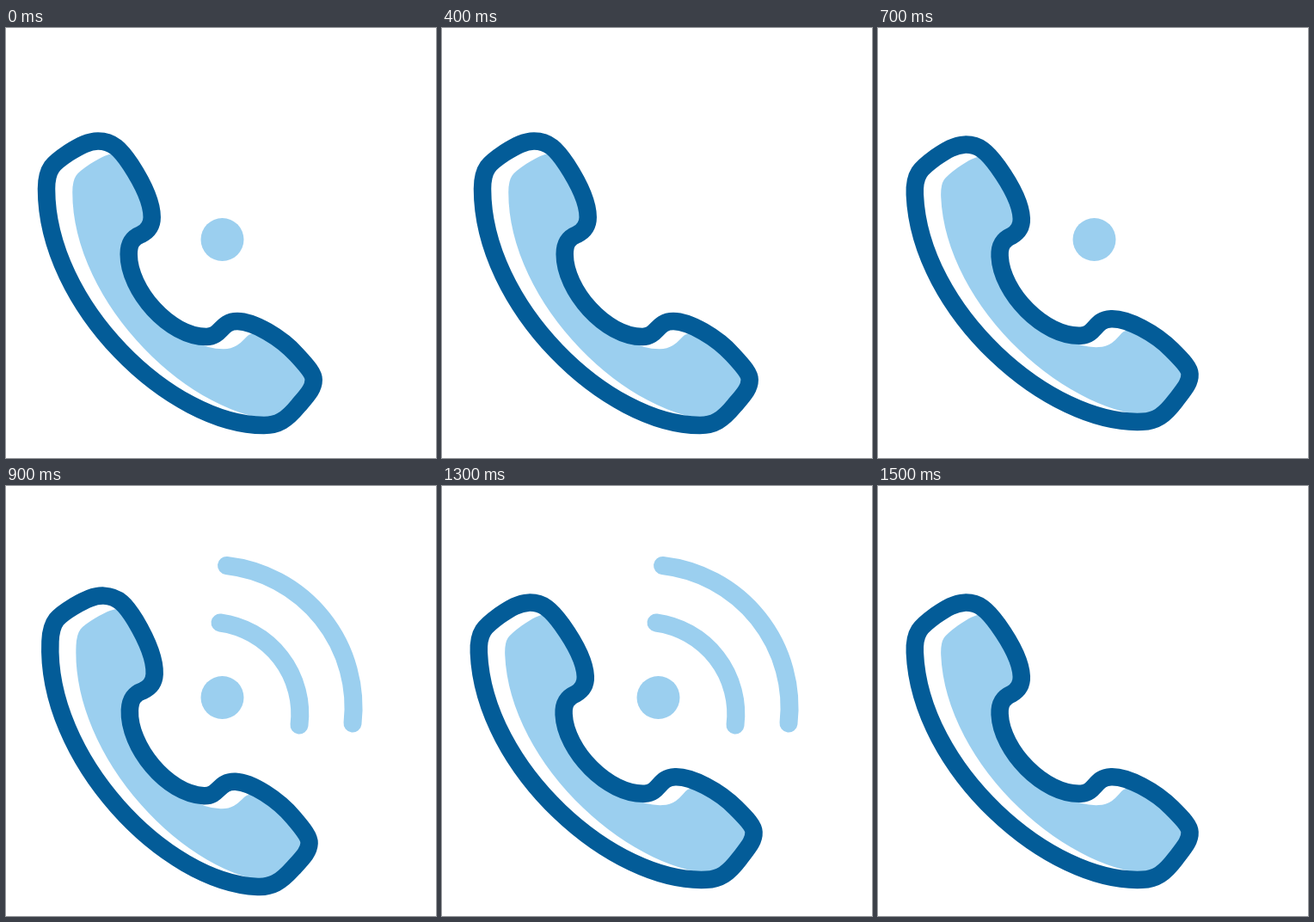
These frames come from a looping animation (500x500 px, 1.6 s). An HTML page:

```html
<!DOCTYPE html>
<html lang="en">
<head>
<meta charset="utf-8">
<title>Ringing phone</title>
<style>
  html, body { margin: 0; width: 100%; height: 100%; overflow: hidden; background: #fff; }
  svg { display: block; width: 100vw; height: 100vh; }
</style>
</head>
<body>
<svg viewBox="0 0 500 500">
  <defs>
    <path id="shape" d="M107 131.500
      C124 131.500 133 141 145 159
      C158 179 169.700 203 169.700 220
      C169.700 230 165 236 157 240
      C147 244 142.700 250 142.700 263
      C142.700 305 190 359 233 359
      C251 359 249 341 269 341
      C288 341 320 360 338 380
      C351 394 357.700 402 357.700 409
      C357.700 419 351 426 340 439
      C326 456 316 462 300 462
      C192 462 47 323 47 187
      C47 163 55 157 73 145
      C86 137 96 131.500 107 131.500Z"/>
    <clipPath id="inside"><use href="#shape"/></clipPath>
  </defs>
  <circle id="dot" cx="251.5" cy="246" r="25" fill="#9bcfef"/>
  <g id="waves" fill="none" stroke="#9bcfef" stroke-width="21" stroke-linecap="round">
    <path d="M249 159A107 107 0 0 1 341 278"/>
    <path d="M256.500 92.500A166 166 0 0 1 403 276"/>
  </g>
  <g id="phone" stroke-width="20.500" stroke-linejoin="round">
    <g clip-path="url(#inside)">
      <use href="#shape" x="20" y="4" fill="#9bcfef" stroke="#fff"/>
    </g>
    <use href="#shape" fill="none" stroke="#035c98"/>
  </g>
</svg>
<script>
const LOOP = 1600, STEP = 100;
const SWING = 8;        // steps per swing
const RING = 16 / 3;    // steps per ring
const TILT = 2.4;       // degrees per step
const [dot, waves, phone] = ['dot', 'waves', 'phone'].map(id => document.getElementById(id));

const show = (el, on) => el.setAttribute('visibility', on ? 'visible' : 'hidden');

// Triangle wave: 0, 1, 2, 1, 0, -1, -2, -1
const swing = n => Math.abs((n + 6) % SWING - 4) - 2;

function draw(ms) {
  const n = Math.floor(ms % LOOP / STEP);
  const ring = n % RING;
  phone.setAttribute('transform', `rotate(${swing(n) * TILT} 203 290)`);
  show(dot, ring < 3.9);
  show(waves, ring > 1.8 && ring < 3.9);
}

const start = performance.now();
function tick() {
  draw(performance.now() - start);
  requestAnimationFrame(tick);
}
draw(0);
tick();
</script>
</body>
</html>
```
